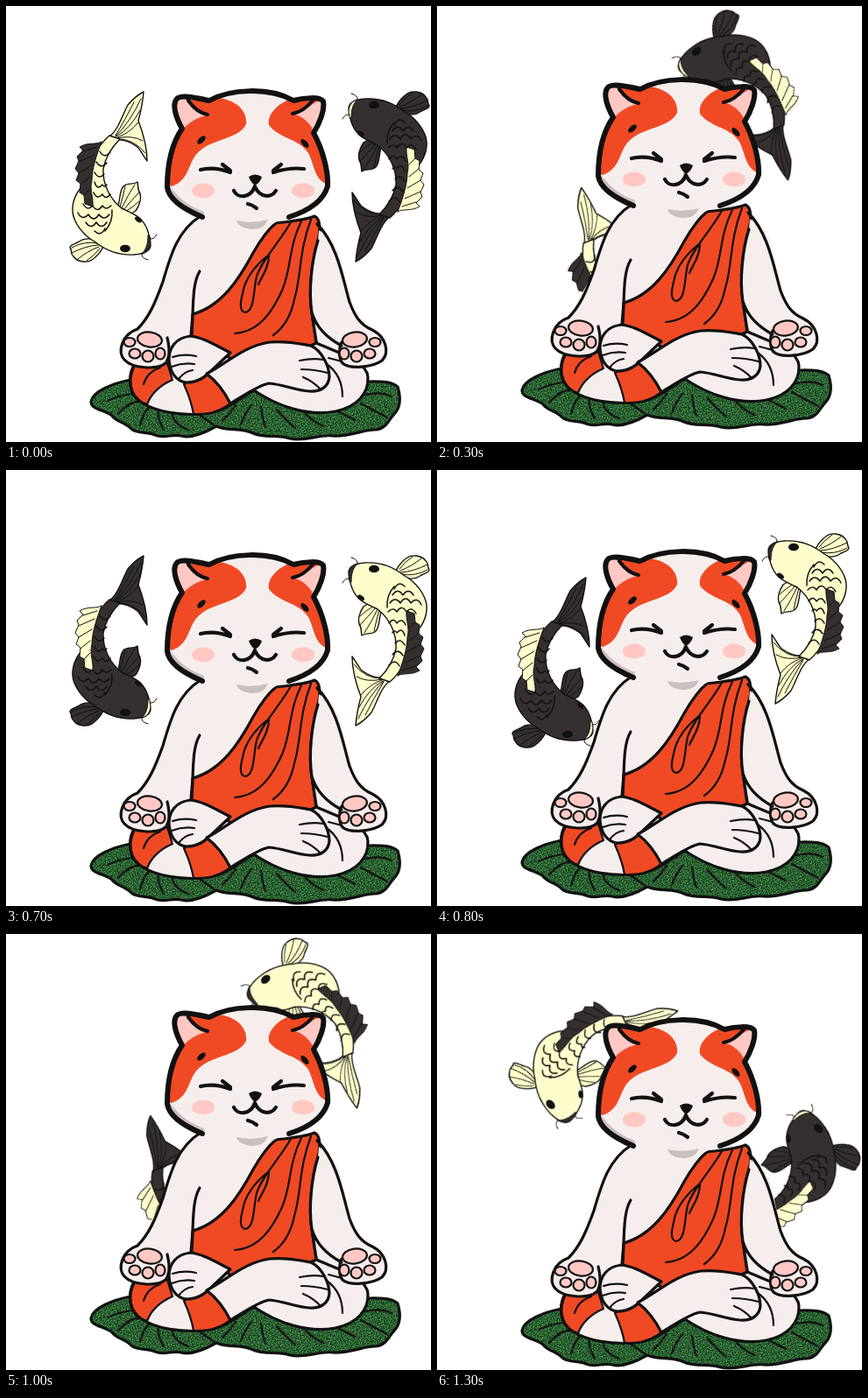
An HTML page for the animation above (1400 ms loop, 485 by 498 pixels).

```html
<!DOCTYPE html>
<html lang="en">
<head>
<meta charset="utf-8">
<title>Meditating cat with two koi</title>
<style>
html, body { margin: 0; width: 100%; height: 100%; overflow: hidden; background: #fff; }
svg { display: block; width: 485px; height: 498px; }
path, ellipse { stroke-linecap: round; stroke-linejoin: round; }
.koi { transform-origin: 159.5px 185.5px; animation: orbit 1.4s step-end infinite; }
.dark { --skin: #352f30; --fin: #fffdcb; }
.pale { --skin: #fffdcb; --fin: #352f30; animation-delay: -.7s; }
.cat { animation: bob .7s step-end infinite; }
.skin { fill: var(--skin); stroke: #111; stroke-width: 1.4; }
.fin { fill: var(--fin); stroke: #111; stroke-width: 1; }
.hair { fill: none; stroke: #111; stroke-width: 1; }
.scale { fill: none; stroke: #111; stroke-width: 1.5; }
.w { fill: #f6eeed; }
.o { fill: #f04a24; }
.p { fill: #ffc8c3; }
.g { fill: #c9bfbe; }
.n { fill: none; }
.l { stroke: #111; stroke-width: 3.2; }
.b { stroke: #111; stroke-width: 6; }
.t { stroke: #111; stroke-width: 2.2; }
.f { fill: none; stroke: #111; stroke-width: 4.2; }
/* each stop is one pose held for a fourteenth of the loop */
@keyframes orbit {
  0% { transform: translate(237px, 19px) rotate(180deg); }
  7.14% { transform: translate(224px, -6px) rotate(180deg); }
  14.28% { transform: translate(206px, -30px) rotate(159deg); }
  21.42% { transform: translate(180.5px, -50px) rotate(138deg); }
  28.57% { transform: translate(129px, -58px) rotate(102deg); }
  35.71% { transform: translate(75.5px, -54px) rotate(66deg); }
  42.85% { transform: translate(53px, -36px) rotate(47deg); }
  49.99% { transform: translate(0, 0) rotate(0deg); }
  57.14% { transform: translate(13px, 25px) rotate(0deg); }
  64.28% { transform: translate(38px, 56px) rotate(-20deg); }
  71.42% { transform: translate(63.5px, 87.5px) rotate(-40deg); }
  78.57% { transform: translate(115px, 98px) rotate(-76deg); }
  85.71% { transform: translate(165.5px, 103px) rotate(-114deg); }
  92.85% { transform: translate(193px, 82px) rotate(-133deg); }
}
@keyframes bob {
  0% { transform: translateY(0); }
  14.28% { transform: translateY(-4px); }
  28.57% { transform: translateY(-9px); }
  42.85% { transform: translateY(-13px); }
  57.14% { transform: translateY(-6px); }
  71.42% { transform: translateY(0); }
  85.71% { transform: translateY(1px); }
}
</style>
</head>
<body>
<svg viewBox="0 0 485 498" xmlns="http://www.w3.org/2000/svg">
<defs>
  <filter id="grass" x="0" y="0" width="1" height="1" color-interpolation-filters="sRGB">
    <feTurbulence type="fractalNoise" baseFrequency=".7" numOctaves="2" seed="4"/>
    <feColorMatrix values=".6 0 0 0 -.13  .85 0 0 0 -.04  .6 0 0 0 -.1  0 0 0 0 1"/>
    <feComposite in2="SourceGraphic" operator="in"/>
  </filter>
  <path id="head" d="M224 241C205 233 186 222 184 207C184 180 190 156 201 140C194 128 189 112 195 106C200 100 222 106 232 108C255 95 300 92 328 108C340 105 358 103 362 109C364 118 358 134 351 145C362 165 368 190 367 206C362 223 345 234 323 241"/>
  <clipPath id="face"><use href="#head"/></clipPath>
  <path id="leaves" d="M142 427C122 431 99 440 97 452C97 461 112 461 121 468C127 476 136 475 143 483C150 489 162 486 170 490C181 495 190 488 200 491C211 494 226 488 240 480C252 486 270 481 282 488C295 494 310 489 324 494C342 498 356 489 373 491C394 492 410 483 422 484C434 483 437 472 443 466C451 458 450 445 447 435C439 428 425 429 412 429Z"/>
  <g id="koi">
    <path class="skin" d="M118 149C128 142 133 124 139 113C145 106 151 101 157 98C156 110 154 120 151 131C156 144 161 160 161 177C156 170 153 164 150 161C143 156 136 152 127 153Z"/>
    <path class="hair" d="M125 149Q142 132 154 106M126 149Q142 140 153 119M127 150Q140 146 151 133M127 151Q144 147 156 154M127 152Q145 151 159 168M125 148Q136 130 146 110"/>
    <path class="skin" d="M108 269C98 265 88 265 82 270C77 272 73 273 73 276C76 280 73 283 77 286C81 292 92 294 98 290C104 286 108 281 111 275Z"/>
    <path class="hair" d="M105 271Q89 268 75 276M105 273Q91 274 75 282M106 275Q93 280 82 289M107 277Q101 285 92 291"/>
    <path class="skin" d="M127 231C131 221 129 211 134 206C139 201 144 205 150 201C151 206 150 210 153 214C155 221 152 228 148 234L138 240Z"/>
    <path class="hair" d="M130 230Q134 216 136 206M132 231Q139 216 147 204M134 233Q143 222 152 213M136 235Q146 229 152 223"/>
    <path class="skin" d="M165 274C164 259 160 248 151 241C145 237 138 234 132 231C119 221 110 204 111 186C114 170 123 159 130 152L118 148C104 160 94 180 92 201C82 209 75 222 76 235C77 247 88 262 101 269C116 281 130 285 146 284C156 283 164 281 165 274Z"/>
    <path class="fin" d="M109 155C103 159 94 155 84 161L88 165L81 172L83 177L79 186L83 191L80 199L85 203L84 213L89 216L90 226L99 229C100 218 95 210 98 199C98 186 104 168 109 155Z"/>
    <path class="hair" d="M104 161L88 166M101 170L83 178M98 182L83 191M96 195L85 204M96 209L89 216"/>
    <path class="scale" d="M107 166q5 9 12 1M103 178q6 9 12 1M101 190q5 9 11 2M101 201q3 10 9 3q2 4 5 0M100 213q4 9 10 2q4 7 9 0M88 226q5 9 11 2q5 9 11 0q4 6 10 0M82 236q5 10 12 2q6 10 12 0q6 8 12 0M91 247q6 9 12 0q6 9 12 0M101 257q7 7 12-3M121 233q1 14-8 24"/>
    <path class="fin" d="M164 263C167 273 163 281 155 283C160 278 162 272 162 262Z"/>
    <ellipse cx="136" cy="277" rx="6" ry="4.2" fill="#111"/>
    <ellipse cx="151" cy="244" rx="4.5" ry="2.5" transform="rotate(38 151 244)" fill="#111"/>
    <path class="hair" d="M164 266Q169 267 172 261M155 283Q154 288 162 290"/>
  </g>
  <g id="pads" class="p t">
    <ellipse cx="164" cy="381" rx="14" ry="8.5" transform="rotate(8 164 381)"/>
    <ellipse cx="141" cy="384" rx="6.5" ry="5"/>
    <ellipse cx="147" cy="397" rx="6.5" ry="5.5"/>
    <ellipse cx="162" cy="400" rx="6.5" ry="6.5"/>
    <ellipse cx="176" cy="397" rx="5.5" ry="6.5"/>
  </g>
</defs>

<g class="koi pale"><use href="#koi"/></g>
<g class="koi dark"><use href="#koi"/></g>

<g class="cat">
  <use href="#leaves" fill="#2a6435" filter="url(#grass)"/>
  <use href="#leaves" class="n l"/>
  <path class="n t" d="M116 451Q130 444 146 443M128 466Q142 451 152 452M153 479Q157 463 164 458M180 484Q172 470 174 463M208 484Q192 478 190 467M238 479Q228 472 222 468M247 474Q256 465 262 456M268 478Q272 466 280 456M296 481Q292 468 291 458M330 482Q316 470 309 461M362 480Q350 474 342 466M398 473Q388 468 379 463M435 470Q420 462 405 454M410 444Q428 440 440 446"/>

  <!-- torso and thighs -->
  <path class="w" d="M222 240C195 258 187 290 178 318L150 370L150 410L195 430L270 440L385 412L400 370L380 280L352 246L320 236Z"/>
  <path class="w l" d="M350 383C375 395 412 404 413 424C414 443 400 458 376 463C345 469 310 458 280 437L300 400Z"/>
  <path class="n t" d="M366 409Q384 422 384 446M368 402Q388 407 402 412"/>
  <path class="w l" d="M146 410C138 426 140 444 155 453C172 464 200 468 226 466C248 464 262 452 284 438L240 405Z"/>
  <path class="o t" d="M147 411C139 426 141 444 156 453L161 455C166 442 176 433 190 427L184 408Z"/>
  <path class="n t" d="M176 413Q161 418 157 432"/>
  <path class="o t" d="M203 432C208 443 212 454 214 466C234 467 248 461 258 452C252 440 242 427 229 420Z"/>

  <!-- robe -->
  <path class="o l" d="M308 248C324 246 340 245 352 240C359 243 359 256 356 268C349 290 345 325 349 350L354 385C330 398 290 404 260 405C240 392 225 380 211 377L213 352C246 343 266 312 282 282C290 268 298 256 308 248Z"/>
  <path class="n t" d="M325 247C312 270 292 290 286 309C282 326 284 348 273 350C264 348 269 333 272 320C278 303 291 291 300 284M337 246C322 276 326 300 315 325C305 347 290 372 261 374M348 244C334 280 337 310 329 335C325 356 316 368 305 376M300 285C300 300 291 310 288 318"/>

  <!-- crossed feet -->
  <path class="w l" d="M256 396C240 388 224 378 210 377C194 379 186 390 186 404C187 418 194 429 206 430C220 430 228 423 236 415Z"/>
  <path class="w l" d="M229 420C252 408 272 388 301 384C320 382 336 386 348 388C361 394 369 412 369 424C368 434 360 441 346 440C330 439 316 432 300 431C286 434 270 446 256 454C250 442 242 430 229 420Z"/>
  <path class="n t" d="M190 401Q203 397 217 400M189 412Q202 407 215 409M197 426Q204 417 213 416M335 405Q350 402 362 404M337 415Q352 415 367 419M339 424Q351 429 359 438"/>

  <!-- arms -->
  <path class="w" d="M222 240C196 256 188 284 179 315C170 340 163 356 150 369C132 375 127 395 135 404C144 414 172 416 182 408C188 400 186 386 184 379L208 376L213 340L222 303L250 260Z"/>
  <path class="n l" d="M222 240C196 256 188 284 179 315C170 340 163 356 150 369C132 375 127 395 135 404C144 414 172 416 182 408C188 400 186 387 184 379M221 303C212 318 214 344 212 376"/>
  <path class="w" d="M357 256C378 274 384 310 392 338C398 354 404 364 418 370C434 378 438 396 429 405C418 413 392 415 384 408C379 401 380 390 383 383L354 378L349 350C345 325 349 290 356 268Z"/>
  <path class="n l" d="M355 249C378 272 384 310 392 338C398 354 404 364 418 370C434 378 438 396 429 405C418 413 392 415 384 408C379 401 380 390 383 384M356 268C349 290 345 325 349 350C354 367 366 379 383 388M349 350L354 383"/>
  <use href="#pads"/>
  <use href="#pads" transform="matrix(-1 0 0 1 562 0)"/>

  <!-- head -->
  <use href="#head" class="w"/>
  <path class="w" d="M220 238L320 240L304 249L240 262Z"/>
  <g clip-path="url(#face)">
    <path class="g" d="M180 200C191 207 196 224 226 235L225 250L180 230Z"/>
    <path class="o" d="M232 104C262 104 276 120 274 135C264 155 228 150 214 174C207 187 206 200 189 206L170 200L180 90Z"/>
    <path class="o" d="M330 104C312 110 298 122 300 136C312 152 334 151 345 168C352 181 352 200 368 204L385 90Z"/>
    <path class="p" d="M194 103C208 104 215 118 231 124C220 127 209 132 202 141L188 130Z"/>
    <path class="p" d="M362 106C350 110 343 119 327 123C338 126 346 132 351 143L370 130Z"/>
  </g>
  <path class="f" d="M208 108Q218 122 230 124M350 108Q339 121 327 123"/>
  <use href="#head" class="n b"/>
  <path class="g" d="M263 245Q281 249 299 244Q294 256 281 255Q266 254 263 245Z"/>
  <ellipse cx="225" cy="211" rx="13" ry="8.5" class="p"/>
  <ellipse cx="339" cy="211" rx="13" ry="8.5" class="p"/>
  <ellipse cx="223" cy="153" rx="6" ry="3" transform="rotate(-42 223 153)" fill="#111"/>
  <ellipse cx="341" cy="157" rx="6" ry="3" transform="rotate(48 341 157)" fill="#111"/>
  <path class="f" d="M222 187Q238 183 256 190M247 181L256 188M340 186Q324 184 305 190M314 181L305 188M260 211C264 220 279 220 284 206C290 220 303 219 308 211M276 226Q281 227 286 231"/>
  <path d="M277 195Q284 190 292 195Q290 202 284 205Q279 201 277 195Z" fill="#111"/>
</g>
</svg>
</body>
</html>
```
